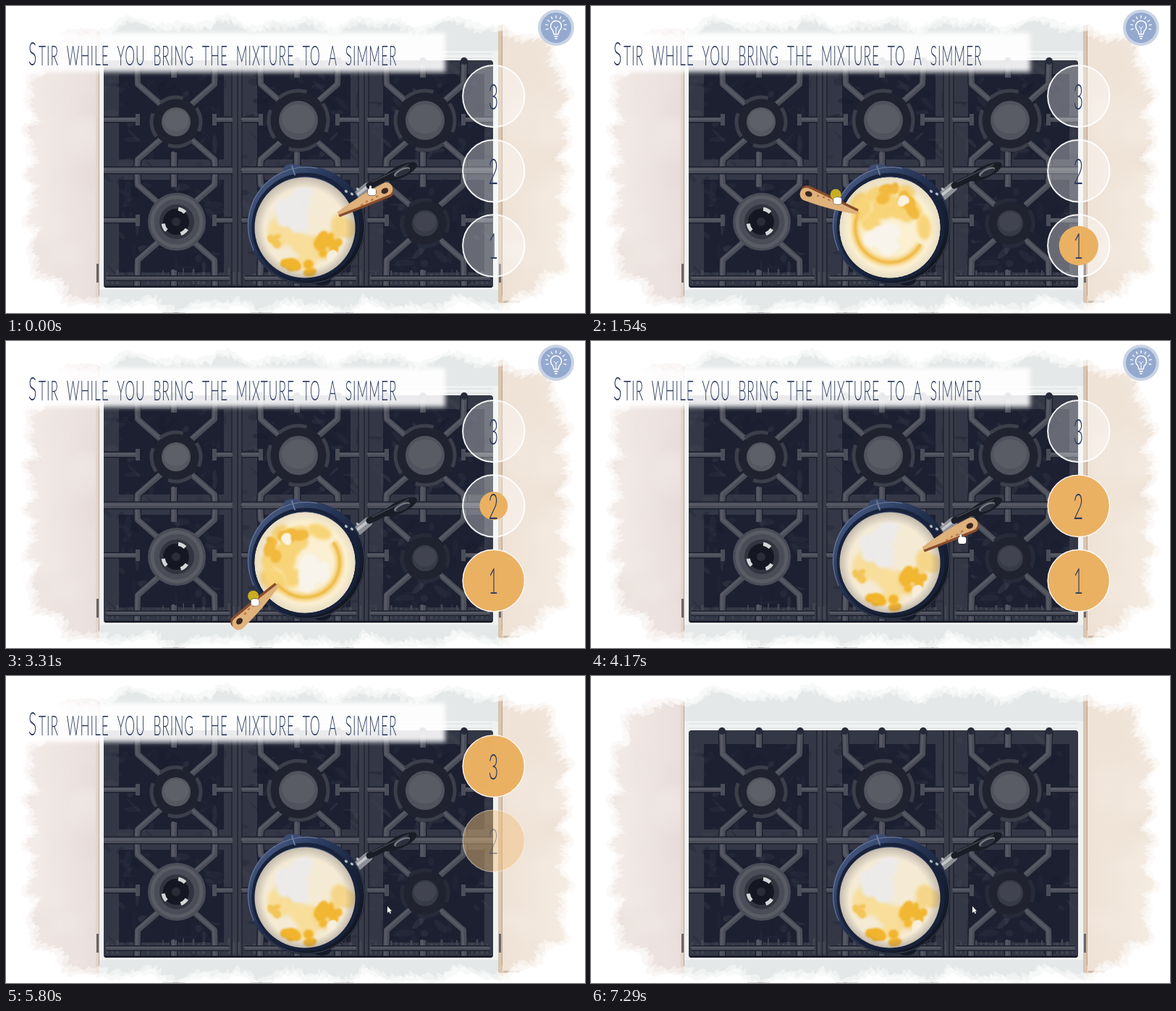
Write an HTML page with a canvas that moves like this. It is 800 px wide and 424 px high and loops after 7.36 s.

```html
<!DOCTYPE html>
<html lang="en">
<head>
<meta charset="utf-8">
<title>Stir the mixture</title>
<style>
html, body { margin: 0; width: 100%; height: 100%; overflow: hidden; background: #fff; }
canvas { display: block; width: 800px; height: 424px; }
</style>
</head>
<body>
<canvas id="stage" width="800" height="424"></canvas>
<script>
const W = 800, H = 424, LOOP = 7360, TAU = Math.PI * 2;
const PAN = { x: 413, y: 306, r: 69.5 };
const REST = -0.424; // direction of the spoon while it rests
const INK = '#2b3a5e', ORANGE = '#eab163';

let seed = 11;
const rnd = () => (seed = (seed * 16807) % 2147483647) / 2147483647;
const between = (a, b) => a + (b - a) * rnd();
const lerp = (a, b, k) => a + (b - a) * k;
const ramp = (t, a, b) => Math.max(0, Math.min(1, (t - a) / (b - a)));

function layer(w, h, paint, k = 1) {
  const c = document.createElement('canvas');
  c.width = w * k; c.height = h * k;
  const g = c.getContext('2d');
  g.scale(k, k);
  g.lineJoin = 'round';
  paint(g);
  return c;
}
function blob(g, x, y, rx, ry, fill, turn = 0) {
  g.beginPath(); g.ellipse(x, y, rx, ry, turn, 0, TAU);
  g.fillStyle = fill; g.fill();
}
const disc = (g, x, y, r, fill) => blob(g, x, y, r, r, fill);
function ring(g, x, y, r, color, w, a = 0, b = TAU) {
  g.beginPath(); g.arc(x, y, r, a, b);
  g.strokeStyle = color; g.lineWidth = w; g.stroke();
}
function line(g, pts, color, w) {
  g.beginPath();
  pts.forEach(p => g.lineTo(...p));
  g.strokeStyle = color; g.lineWidth = w; g.stroke();
}
function rect(g, x0, y0, x1, y1, fill) {
  g.fillStyle = fill; g.fillRect(x0, y0, x1 - x0, y1 - y0);
}
function fade(g, x0, y0, x1, y1, ...colors) {
  const k = g.createLinearGradient(x0, y0, x1, y1);
  colors.forEach((c, i) => k.addColorStop(i / (colors.length - 1), c));
  return k;
}
function lettering(g, text, x, y, size, align = 'left') {
  g.save();
  g.translate(x, y); g.scale(0.47, 1);
  g.font = `300 ${size}px Lato, "Open Sans", sans-serif`;
  g.letterSpacing = '2px'; g.wordSpacing = '11px';
  g.textAlign = align;
  g.fillStyle = INK;
  g.fillText(text, 0, 0);
  g.restore();
}

/* ---------- stove ---------- */
function bar(g, pts, w = 8) {
  line(g, pts, '#1d2130', w + 3);
  line(g, pts, '#4b4d59', w);
  line(g, pts.map(([x, y]) => [x - 1, y - 1]), '#575964', w * 0.4);
}
function grate(g, cx, cy, x0, x1, y0, y1) {
  for (const sx of [-1, 1]) {
    const side = sx < 0 ? x0 : x1;
    bar(g, [[side, cy - 3], [cx + sx * 54, cy - 3]], 6);
    line(g, [[cx + sx * 53, cy - 11], [cx + sx * 53, cy + 5]], '#4b4d59', 6);
    for (const [sy, y] of [[-1, y0], [1, y1]])
      bar(g, [[cx + sx * 54, y], [cx + sx * 53, cy + sy * 52], [cx + sx * 21, cy + sy * 24]]);
  }
  for (const [y, s] of [[y0, 1], [y1, -1]]) bar(g, [[cx - 3, y], [cx - 3, y + s * 24]]);
}
function burner(g, x, y, r, top, shade) {
  disc(g, x, y, r + 13, '#20232f');
  for (const a of [-0.6, 0.9, 2.5, 4]) ring(g, x, y, r + 14, shade, 5, a, a + 1);
  disc(g, x, y, r, top);
  blob(g, x, y - 2, r * 0.85, r * 0.75, 'rgba(255,255,255,.05)');
}
function cooktop(g) {
  g.save();
  g.beginPath(); g.roundRect(135, 75, 538, 314, 4); g.clip();
  rect(g, 135, 75, 673, 389, '#343745');
  const cols = [[135, 313, 235], [326, 488, 405], [500, 673, 579]];
  for (const [a, b] of cols) for (const [c, d] of [[94, 212], [240, 368]])
    rect(g, a + 21, c, b - 12, d, '#1c2031');
  for (let i = 0; i < 420; i++) {
    g.globalAlpha = between(0.1, 0.35);
    blob(g, between(138, 670), between(80, 386), between(3, 14), between(1, 5),
      ['#454854', '#161a2a', '#363946'][i % 3], Math.floor(rnd() * 4) * TAU / 8);
  }
  g.globalAlpha = 1;
  for (const x of [319, 494]) {
    rect(g, x - 7, 75, x + 7, 389, '#3a3c49');
    for (const d of [-7, 1, 7]) line(g, [[x + d, 75], [x + d, 389]], '#1f2332', 1.5);
  }
  for (let x = 140; x < 670; x += 7) line(g, [[x, between(362, 372)], [x, 384]], '#454753', between(0, 4));
  for (const [a, b, cx] of cols) {
    grate(g, cx, 160, a, b, 75, 226);
    grate(g, cx, 299, a, b, 226, 389);
    bar(g, [[a, 227], [b, 227]]);
    bar(g, [[a + 4, 376], [b - 4, 376]], 5);
  }
  burner(g, 235, 160, 20, '#555761', '#3c3e4a');
  burner(g, 404, 158, 27, '#50525d', '#3c3e4a');
  burner(g, 579, 158, 27, '#50525d', '#3c3e4a');
  burner(g, 579, 300, 18, '#373a47', '#272b39');
  disc(g, 236, 298, 40, '#4a4c57');
  ring(g, 236, 298, 34, '#5a5c65', 5);
  disc(g, 236, 298, 24, '#32343f');
  disc(g, 235, 298, 18, '#151822');
  for (const a of [-1.4, 0.6, 2.4]) ring(g, 235, 298, 18, '#d5d6d8', 5, a, a + 0.6);
  disc(g, 235, 298, 6, '#2a2d38');
  line(g, [[135, 388], [673, 388]], '#171a28', 3);
  g.restore();
  for (const [, , cx] of cols) for (const d of [-54, -3, 54]) disc(g, cx + d, 76, 5, '#262a39');
}
function wash(g, x0, x1, from, to, tints) {
  rect(g, x0, 0, x1, H, fade(g, x0, 0, x1, 0, from, to));
  g.save();
  g.beginPath(); g.rect(x0, 0, x1 - x0, H); g.clip();
  g.filter = 'blur(8px)';
  g.globalAlpha = 0.2;
  for (let i = 0; i < 24; i++)
    blob(g, between(x0, x1), between(0, H), between(10, 30), between(8, 30), tints[i % tints.length]);
  g.restore();
}
// White paper left around the painting: a wavy, jittered superellipse.
function paper(g) {
  for (const [alpha, grow, jitter] of [[0.4, -7, 5], [0.5, -3, 4], [1, 3, 3]]) {
    g.beginPath(); g.rect(-2, -2, W + 4, H + 4);
    for (let i = 0; i < 700; i++) {
      const a = i / 700 * TAU, c = Math.cos(a), s = Math.sin(a);
      const k = (c ** 6 + s ** 6) ** (-1 / 6);
      const wave = grow + 5 * Math.sin(a * 23) + 4 * Math.sin(a * 41 + 1) + between(-jitter, jitter);
      const x = 403 + (372 + wave) * c * k, y = 220 + (197 + wave) * s * k;
      i ? g.lineTo(x, y) : g.moveTo(x, y);
    }
    g.closePath();
    g.globalAlpha = alpha;
    g.fillStyle = '#fff'; g.fill('evenodd');
  }
  g.globalAlpha = 1;
}
function skillet(g) {
  g.lineCap = 'round';
  line(g, [[486, 262], [500, 250]], '#8d9096', 13);
  line(g, [[486, 260], [500, 249]], '#c3c5c8', 4);
  line(g, [[502, 248], [540, 230]], '#1a1d26', 9);
  blob(g, 545, 229, 25, 8.5, '#1a1d26', -0.45);
  line(g, [[506, 243], [556, 219]], '#4b4f5b', 1.3);
  blob(g, 547, 229, 12, 4.5, '#777a83', -0.45);
  blob(g, 548, 230, 10.5, 3.3, '#2d303d', -0.45);
  blob(g, 397, 226, 14, 8, '#3c4c71');
  blob(g, 436, 379, 13, 7, '#151a28');
  disc(g, 415, 303, 81.5, fade(g, 355, 240, 475, 365, '#45577f', '#28375a', '#172036', '#12161f'));
  ring(g, 415, 303, 80.5, '#71809f', 1, 2.7, 4.9);
  ring(g, 415, 303, 80.5, '#3f4656', 1, -0.6, 2.4);
  ring(g, 414, 305, 72, '#18223a', 5);
  line(g, [[395, 221], [399, 233]], '#6a7b9f', 2);
  for (let i = 0; i < 3; i++) blob(g, 470 + 8 * i, 256 + 4 * Math.sin(i * 2), 2.4, 1.8, '#b0b5bf', 0.6);
}
const scene = layer(W, H, g => {
  wash(g, 0, 130, '#f6f0ec', '#e9dedb', ['#e0d2d0', '#f5efe9', '#ecdfd8']);
  wash(g, 684, W, '#efe2d6', '#f6eee5', ['#ebdccc', '#f8f1e9', '#efe2d5']);
  rect(g, 129, 0, 684, H, '#e5e8e8');
  rect(g, 129, 62, 684, 392, '#f0f2f2');
  for (const y of [66, 72]) line(g, [[135, y], [672, y]], '#d8dcdd', 1);
  for (const [x, w, tint] of [[124, 5, '#e3d5cb'], [680, 6, '#dac5b0']]) {
    rect(g, x, 18, x + w, 410, tint);
    line(g, [[x + w - 0.5, 18], [x + w - 0.5, 400]], '#b5a394', 1);
    rect(g, x + 1, 356, x + 4, 382, '#6a6468');
  }
  rect(g, 687, 407, 770, 410, '#cdbcac');
  rect(g, 687, 410, W, H, '#f5eee6');
  line(g, [[172, 423.5], [480, 423.5]], '#8d8f92', 1);
  cooktop(g);
  skillet(g);
  paper(g);
});

/* ---------- mixture ---------- */
// Random blurred spots in a sector of the pan.
function stains(g, n, a0, a1, r0, r1, size, color, blur) {
  g.filter = `blur(${blur}px)`;
  for (let i = 0; i < n; i++) {
    const a = between(a0, a1), r = between(r0, r1);
    blob(g, r * Math.cos(a), r * Math.sin(a), size * between(0.6, 1.3), size * between(0.5, 1), color, a + 1.5);
  }
}
function broth(base, shade, paint) {
  return layer(140, 140, g => {
    g.translate(70, 70);
    g.beginPath(); g.arc(0, 0, PAN.r, 0, TAU); g.clip();
    rect(g, -70, -70, 70, 70, base);
    paint(g);
    g.filter = 'none';
    const rim = g.createRadialGradient(0, 2, 56, 0, 0, 70);
    rim.addColorStop(0, 'rgba(115,108,110,0)');
    rim.addColorStop(1, `rgba(115,108,110,${shade})`);
    rect(g, -70, -70, 70, 70, rim);
  }, 2);
}
const calm = broth('#f5ebd5', 0.4, g => {
  stains(g, 9, 1.1, 3.2, 15, 55, 17, '#f8de9a', 6);
  stains(g, 9, -2.7, -1.5, 8, 50, 17, '#edebea', 5);
  stains(g, 6, -0.2, 0.9, 30, 60, 13, '#f6d68a', 5);
  stains(g, 9, 0.35, 1, 26, 56, 9, '#f2b732', 2.5);
  stains(g, 6, 1.4, 2.1, 48, 62, 9, '#f1b42c', 2.5);
  stains(g, 4, 2.6, 2.9, 40, 50, 6, '#f3c659', 2);
  stains(g, 3, 0.75, 0.95, 50, 58, 7, '#f7eedb', 1.5);
});
const stirred = broth('#fbf0d2', 0.15, g => {
  g.rotate(-0.63 * TAU);
  stains(g, 16, -3, 0, 25, 62, 15, '#f8d478', 5);
  stains(g, 10, -2.5, -0.6, 36, 56, 9, '#f2b93f', 2.5);
  for (const [w, blur, color] of [[11, 4, '#f6d17c'], [4, 1.5, '#efbc4c']]) {
    g.filter = `blur(${blur}px)`;
    ring(g, 0, 0, 48, color, w, 0.5, 3.6);
  }
  stains(g, 8, 1, 2.9, 5, 30, 14, '#f8f4ec', 4);
  stains(g, 3, -1.4, -1, 38, 46, 6, '#fbf3e0', 1.5);
});

/* ---------- moving parts ---------- */
const banner = layer(W, 120, g => {
  g.filter = 'blur(3px)';
  rect(g, 20, 37, 607, 91, 'rgba(255,255,255,.9)');
  g.filter = 'none';
  lettering(g, 'S', 31, 82, 45);
  lettering(g, 'TIR WHILE YOU BRING THE MIXTURE TO A SIMMER', 45, 82, 37);
});

function spoon(g) {
  g.save();
  g.translate(526, 254);
  g.rotate(-0.47);
  for (const [dy, color] of [[2, '#874c2d'], [-1.5, '#dfb17b']]) {
    g.beginPath();
    g.moveTo(-75, dy - 2);
    g.quadraticCurveTo(-38, dy - 9, 0, dy - 9);
    g.arc(0, dy, 9, -TAU / 4, TAU / 4);
    g.quadraticCurveTo(-38, dy + 6, -75, dy + 2);
    g.closePath();
    g.fillStyle = color; g.fill();
  }
  for (let i = 0; i < 4; i++) blob(g, -16 - 8 * i, 2 + i % 2, 2, 1.2, '#b8743f');
  blob(g, -3, 0, 5, 3.8, '#3a2722');
  g.restore();
}

function outline(g) {
  g.strokeStyle = '#222'; g.lineWidth = 1; g.stroke();
  g.fillStyle = '#fff'; g.fill();
}
const hand = finger => g => {
  g.beginPath();
  g.roundRect(-3, 4, 11, 9.5, 3);
  if (finger) g.roundRect(-1, 0, 3, 9, 1.5);
  outline(g);
};
function arrow(g) {
  g.beginPath();
  for (const p of [[0, 0], [0, 9], [2.5, 7], [6, 6.5]]) g.lineTo(...p);
  g.closePath();
  outline(g);
  line(g, [[2.5, 6], [4.3, 10]], '#fff', 1.5);
}
const point = hand(true), grip = hand(false);

function bulb(g) {
  disc(g, 760, 30, 25, '#c9d3e5');
  disc(g, 760, 30, 21, '#94a9ce');
  ring(g, 760, 28, 7.5, '#fff', 1.5, 2.2, 7.22);
  line(g, [[755.6, 34], [757, 39], [763, 39], [764.4, 34]], '#fff', 1.4);
  line(g, [[757, 28], [760, 31], [763, 28]], '#fff', 1);
  line(g, [[760, 31], [760, 38]], '#fff', 1);
  for (const d of [0, 3]) line(g, [[757.5 + d / 3, 42 + d], [762.5 - d / 3, 42 + d]], '#fff', 1.7);
  for (let i = 0; i < 9; i++) {
    const a = Math.PI * (0.9 + i * 0.15), c = Math.cos(a), s = Math.sin(a);
    line(g, [[760 + 11 * c, 28 + 11 * s], [760 + 15 * c, 28 + 15 * s]], '#fff', 1.3);
  }
}

/* ---------- timing ---------- */
// near and far: pointer distance from the pan centre at the start and end
const STIRS = [
  { from: 240, to: 1960, near: 106, far: 77 },
  { from: 2600, to: 3750, near: 85, far: 85 },
  { from: 4200, to: 5250, near: 80, far: 32 }
];
const STOPS = [[0, 503, 248], [2400, 480, 331], [4170, 511, 266], [5550, 527, 318]];

const share = (s, t) => ramp(t, s.from, s.to) ** 1.65;
function held(s, p) {
  const a = REST + 0.15 + p * TAU, r = lerp(s.near, s.far, p);
  return [PAN.x + r * Math.cos(a), PAN.y + r * Math.sin(a)];
}
const track = STOPS.flatMap((stop, i) => {
  const s = STIRS[i];
  return s ? [stop, [s.from, ...held(s, 0)], [s.to, ...held(s, 1)]] : [stop];
});
function drift(t) {
  const i = track.findIndex(k => k[0] > t);
  if (i < 0) return STOPS[3].slice(1);
  const [a, x, y] = track[i - 1], [b, u, v] = track[i], k = ramp(t, a, b);
  return [lerp(x, u, k), lerp(y, v, k)];
}

function counter(g, s, i, t) {
  const x = 673.8, y = 331 - 103.2 * i, out = 5320 + 240 * i;
  const alpha = 1 - ramp(t, out, out + 400);
  if (!alpha) return;
  const p = share(s, t), pulse = ramp(t, s.to, s.to + 380);
  g.globalAlpha = alpha;
  disc(g, x, y, 43, 'rgba(255,255,255,.33)');
  disc(g, x, y, 43 * p, ORANGE);
  ring(g, x, y, 42.7, 'rgba(255,255,255,.92)', 2 - 0.6 * Math.floor(p));
  if (pulse > 0 && pulse < 1) {
    g.globalAlpha = alpha * 0.55 * (1 - pulse);
    disc(g, x, y, lerp(43, 66, pulse), ORANGE);
    g.globalAlpha = alpha;
  }
  lettering(g, String(i + 1), x, y + 18, 50, 'center');
}

const ctx = document.getElementById('stage').getContext('2d');

function draw(t) {
  const g = ctx;
  const fadeOut = (a, b, paint) => {
    g.globalAlpha = 1 - ramp(t, a, b);
    if (g.globalAlpha) paint(g);
    g.globalAlpha = 1;
  };
  g.drawImage(scene, 0, 0);

  const now = STIRS.find(s => t >= s.from && t < s.to);
  const p = now ? share(now, t) : 0;
  g.save();
  g.translate(PAN.x, PAN.y);
  g.rotate(p * TAU);
  g.drawImage(calm, -70, -70, 140, 140);
  if (now) {
    g.globalAlpha = ramp(t, now.from, now.from + 200) * ramp(t, now.to, now.to - 200);
    g.drawImage(stirred, -70, -70, 140, 140);
  }
  g.translate(-PAN.x, -PAN.y);
  fadeOut(5250, 5500, spoon);
  g.restore();

  fadeOut(6430, 7290, () => g.drawImage(banner, 0, 0));
  STIRS.forEach((s, i) => counter(g, s, i, t));
  fadeOut(5250, 5540, bulb);

  const [x, y] = now ? held(now, p) : drift(t);
  if (now) disc(g, x, y, 7.5, 'rgba(250,215,20,.75)');
  g.save();
  g.translate(x, y);
  (now ? grip : t < 5400 ? point : arrow)(g);
  g.restore();
}

const start = performance.now();
function tick() {
  draw((performance.now() - start) % LOOP);
  requestAnimationFrame(tick);
}
tick();
</script>
</body>
</html>
```
